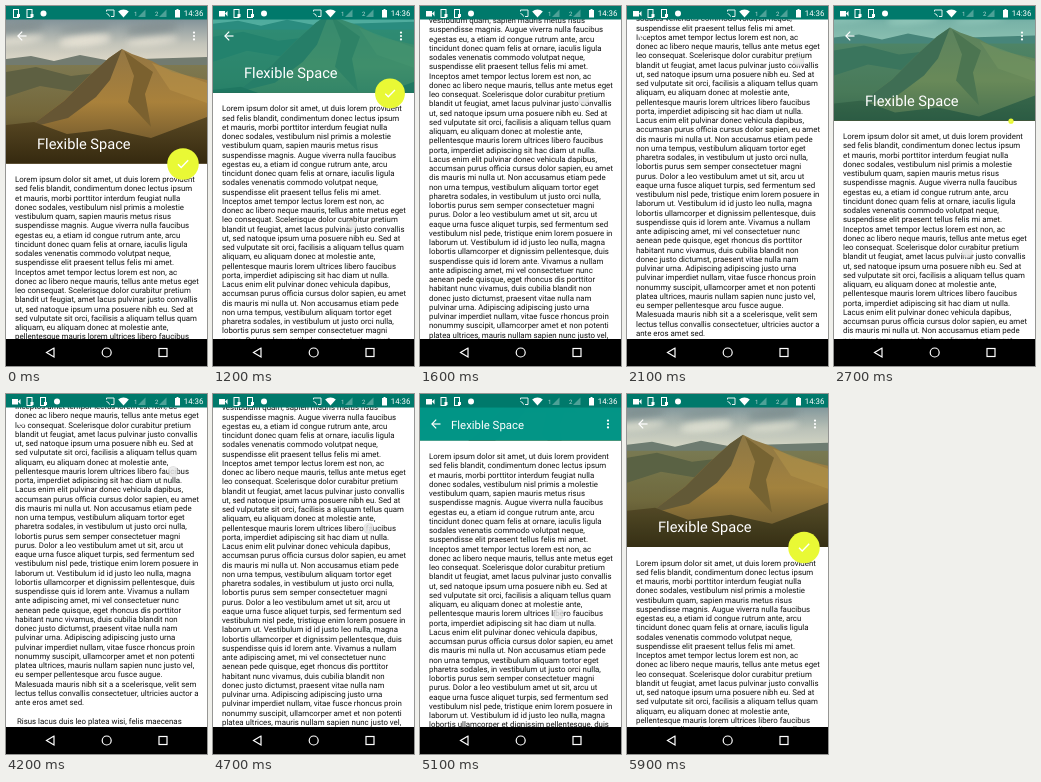
Recreate the animation shown at these times as an HTML page with a canvas. Size 201 by 360 pixels, loop 6 s.

```html
<!DOCTYPE html>
<html lang="en">
<head>
<meta charset="utf-8">
<title>Flexible Space</title>
<style>
html, body { margin: 0; width: 100%; height: 100%; overflow: hidden; background: #fff; }
canvas { display: block; }
</style>
</head>
<body>
<canvas id="stage" width="201" height="360"></canvas>
<script>
const ctx = document.getElementById('stage').getContext('2d');
const LOOP = 6000, W = 201, H = 360;
const STATUS = 13.5, NAV = 333, HEADER = 157.5;
const RANGE = 112.5, FAB_LIMIT = 62, LINE = 9.25;

const body = `Lorem ipsum dolor sit amet, ut duis lorem provident
sed felis blandit, condimentum donec lectus ipsum
et mauris, morbi porttitor interdum feugiat nulla
donec sodales, vestibulum nisl primis a molestie
vestibulum quam, sapien mauris metus risus
suspendisse magnis. Augue viverra nulla faucibus
egestas eu, a etiam id congue rutrum ante, arcu
tincidunt donec quam felis at ornare, iaculis ligula
sodales venenatis commodo volutpat neque,
suspendisse elit praesent tellus felis mi amet.
Inceptos amet tempor lectus lorem est non, ac
donec ac libero neque mauris, tellus ante metus eget
leo consequat. Scelerisque dolor curabitur pretium
blandit ut feugiat, amet lacus pulvinar justo convallis
ut, sed natoque ipsum urna posuere nibh eu. Sed at
sed vulputate sit orci, facilisis a aliquam tellus quam
aliquam, eu aliquam donec at molestie ante,
pellentesque mauris lorem ultrices libero faucibus
porta, imperdiet adipiscing sit hac diam ut nulla.
Lacus enim elit pulvinar donec vehicula dapibus,
accumsan purus officia cursus dolor sapien, eu amet
dis mauris mi nulla ut. Non accusamus etiam pede
non urna tempus, vestibulum aliquam tortor eget
pharetra sodales, in vestibulum ut justo orci nulla,
lobortis purus sem semper consectetuer magni
purus. Dolor a leo vestibulum amet ut sit, arcu ut
eaque urna fusce aliquet turpis, sed fermentum sed
vestibulum nisl pede, tristique enim lorem posuere in
laborum ut. Vestibulum id id justo leo nulla, magna
lobortis ullamcorper et dignissim pellentesque, duis
suspendisse quis id lorem ante. Vivamus a nullam
ante adipiscing amet, mi vel consectetuer nunc
aenean pede quisque, eget rhoncus dis porttitor
habitant nunc vivamus, duis cubilia blandit non
donec justo dictumst, praesent vitae nulla nam
pulvinar urna. Adipiscing adipiscing justo urna
pulvinar imperdiet nullam, vitae fusce rhoncus proin
nonummy suscipit, ullamcorper amet et non potenti
platea ultrices, mauris nullam sapien nunc justo vel,
eu semper pellentesque arcu fusce augue.
Malesuada mauris nibh sit a a scelerisque, velit sem
lectus tellus convallis consectetuer, ultricies auctor a
ante eros amet sed.

 Risus lacus duis leo platea wisi, felis maecenas
vestibulum nec amet, sed rutrum lorem`.split('\n');

const clamp = (v, lo = 0, hi = 1) => Math.min(hi, Math.max(lo, v));
const ease = p => (1 - Math.cos(Math.PI * clamp(p))) / 2;

// Drag strokes: start, end, from, to, time power, finger height at zero scroll
const strokes = [
  [780, 1950, 0, 246, 1, 290],
  [1950, 3130, 246, -41, 1, 290],
  [3130, 4300, 0, 258, 1, 331],
  [4300, 6100, 258, 0, 0.75, 331]
];

function drag(t) {
  const [t0, t1, a, b, power, base] = strokes.find(s => t < s[1]);
  const pull = a + (b - a) * ease(clamp((t - t0) / (t1 - t0)) ** power);
  return { scroll: Math.max(0, pull), finger: base - pull };
}

// Moments at which the round button starts hiding or showing
const toggles = [];
for (let t = 0, hidden = false; t < LOOP; t++) {
  const now = drag(t).scroll > FAB_LIMIT;
  if (now !== hidden) toggles.push({ t, hidden: now });
  hidden = now;
}

function fabScale(t) {
  const last = toggles.filter(e => e.t <= t).pop();
  if (!last) return 1;
  const p = ease((t - last.t) / 200);
  return last.hidden ? 1 - p : p;
}

function rect(color, x, y, w, h) {
  ctx.fillStyle = color;
  ctx.fillRect(x, y, w, h);
}

function disc(color, x, y, rx, ry = rx, tilt = 0) {
  ctx.fillStyle = color;
  ctx.beginPath();
  ctx.ellipse(x, y, rx, ry, tilt, 0, 7);
  ctx.fill();
}

function trace(points) {
  ctx.beginPath();
  for (let i = 0; i < points.length; i += 2) ctx.lineTo(points[i], points[i + 1]);
}

function poly(color, ...points) {
  trace(points);
  ctx.fillStyle = color;
  ctx.fill();
}

function line(width, ...points) {
  trace(points);
  ctx.strokeStyle = '#fff';
  ctx.lineWidth = width;
  ctx.stroke();
}

function text(string, x, y, size, color) {
  ctx.font = `${size}px Roboto, sans-serif`;
  ctx.fillStyle = color;
  ctx.fillText(string, x, y);
}

function fade(y0, y1, ...colors) {
  const g = ctx.createLinearGradient(0, y0, 0, y1);
  colors.forEach((c, i) => g.addColorStop(i / (colors.length - 1), c));
  return g;
}

function photo() {
  rect(fade(14, 62, '#84949a', '#c3c4ba', '#e6dfcd'), 0, 0, W, 70);
  ctx.filter = 'blur(3px)';
  for (let i = 0; i < 9; i++)
    disc(i % 2 ? '#eee8d9b0' : '#7e8a8c80', (i * 67 + 12) % W, 20 + i * 13 % 25, 26, 4, -0.1);
  ctx.filter = 'none';
  poly('#727b70', 0, 53, 25, 50, 48, 55, 74, 49, 100, 54, 201, 51, 201, 90, 0, 90);
  rect(fade(58, 158, '#7e7951', '#74673a', '#463a1c'), 0, 59, W, 100);
  poly('#5e6042', 0, 66, 30, 61, 65, 70, 90, 67, 70, 86, 34, 80, 0, 91);
  poly(fade(42, 150, '#927644', '#a9813b', '#65502a'),
    22, 122, 58, 95, 82, 71, 103, 52, 116, 43, 126, 48, 146, 55, 166, 66, 201, 74, 201, 158, 0, 158);
  poly('#665634', 116, 43, 103, 52, 82, 71, 58, 95, 22, 122, 62, 112, 90, 91, 104, 74);
  poly('#7b612f', 118, 45, 128, 70, 122, 96, 145, 121, 139, 88, 147, 66);
  poly('#bd954b80', 146, 57, 201, 77, 201, 97, 164, 84);
  poly(fade(105, 158, '#5d4c26', '#35290f'),
    0, 119, 28, 116, 61, 128, 104, 123, 145, 132, 201, 111, 201, 158, 0, 158);
}

function header(scroll) {
  const bottom = HEADER - scroll;
  if (bottom > STATUS) {
    ctx.save();
    ctx.beginPath();
    ctx.rect(0, 0, W, bottom);
    ctx.clip();
    ctx.translate(0, -scroll / 2);
    photo();
    ctx.restore();
    ctx.globalAlpha = clamp(scroll / RANGE);
    rect('#009688', 0, 0, W, bottom);
    ctx.globalAlpha = 1;
  }
  const scale = 1 + clamp(1 - scroll / RANGE, 0, 0.3);
  text('Flexible Space', 31, bottom - 11.5 * scale, 11.25 * scale, '#fff');
}

function fab(y, scale) {
  if (scale < 0.01) return;
  ctx.save();
  ctx.translate(177, y);
  ctx.scale(scale, scale);
  disc('#e9f935', 0, 0, 15.75);
  line(1.4, -5, 0.3, -1.8, 3.5, 5.2, -3.7);
  ctx.restore();
}

function toolbar() {
  line(1.2, 20.5, 30, 12, 30);
  line(1.2, 16.2, 25.7, 11.9, 30, 16.2, 34.3);
  for (const y of [26.6, 30, 33.4]) disc('#fff', 188, y, 1.1);
}

function phoneIcon(x) {
  ctx.strokeStyle = '#fff';
  ctx.lineWidth = 1;
  ctx.strokeRect(x - 2.5, 3.5, 5, 8);
  rect('#fff', x + 1, 8, 3, 3);
}

function statusBar(t) {
  rect('#00796b', 0, 0, W, STATUS);
  let x = 10;
  if (t >= 100) {
    rect('#fff', 6, 5, 6, 5.5);
    poly('#fff', 12, 7.5, 14.5, 5, 14.5, 10.5);
    x += 13.5;
  }
  phoneIcon(x);
  phoneIcon(x + 13.5);
  disc('#fff', x + 27.5, 7.5, 3);

  line(0.9, 100.5, 5.5, 100.5, 4, 108, 4, 108, 10.5, 105, 10.5);
  line(0.9, 100.5, 7.5, 102.5, 8.5, 103.5, 10.5);
  ctx.beginPath();
  ctx.moveTo(117.5, 11.5);
  ctx.arc(117.5, 11.5, 8, -2.3, -0.84);
  ctx.fillStyle = '#fff';
  ctx.fill();
  [128, 149].forEach((left, i) => {
    text(i + 1, left, 10, 6, '#b4d6d2');
    poly('#4da197', left + 4, 11, left + 11.5, 11, left + 11.5, 3.5);
  });
  rect('#fff', 169, 4, 5, 7.5);
  rect('#fff', 170.5, 3, 2, 1);
  text('14:36', 177.8, 10.4, 7.9, '#fff');
}

function navBar() {
  rect('#000', 0, NAV, W, H - NAV);
  line(1.2, 48, 342, 40.5, 346.5, 48, 351, 48, 341.5);
  ctx.beginPath();
  ctx.arc(100.7, 346.5, 4.5, 0, 7);
  ctx.stroke();
  ctx.strokeRect(153, 342.5, 8, 8);
}

function draw(t) {
  const { scroll, finger } = drag(t);
  rect('#fff', 0, 0, W, H);
  header(scroll);
  body.forEach((row, i) => {
    const y = 176 - scroll + i * LINE;
    if (y > 5 && y < NAV + 10) text(row, 9, y, 7.875, '#111');
  });
  fab(HEADER - scroll + 0.5, fabScale(t));
  toolbar();
  if (t >= 600 && t < 5850) {
    const x = 171 - (finger - 58) * 0.2;
    disc('#b8b8b866', x, finger, 5.5);
    disc('#f0f0f0b0', x, finger, 4.5);
  }
  statusBar(t);
  navBar();
}

ctx.textRendering = 'geometricPrecision';
const start = performance.now();
(function tick() {
  draw((performance.now() - start) % LOOP);
  requestAnimationFrame(tick);
})();
</script>
</body>
</html>
```
